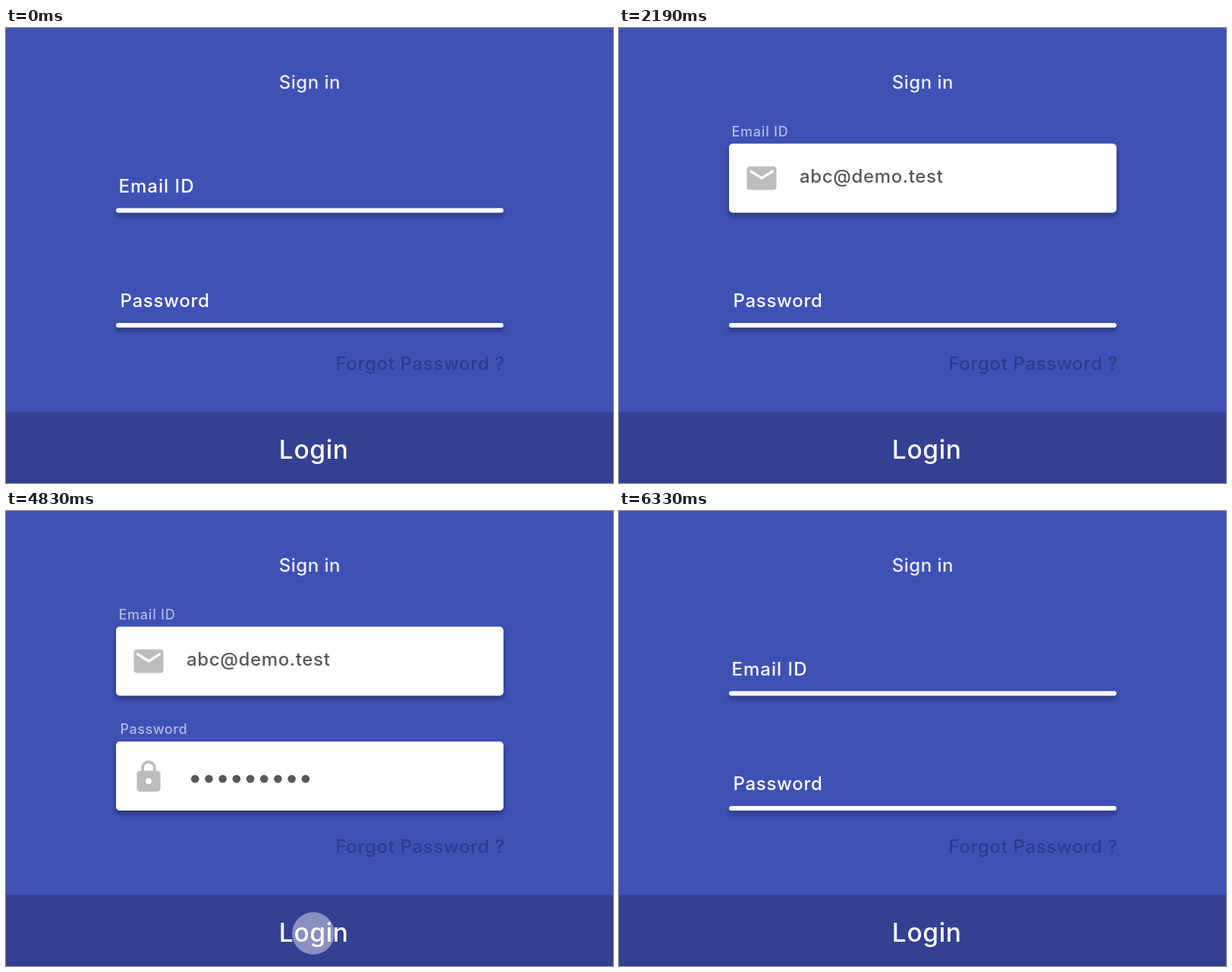
Write an HTML page that moves like this. It is 800x600 px and loops after 6450 ms.

```html
<!DOCTYPE html>
<html lang="en">
<head>
<meta charset="utf-8">
<title>Sign in</title>
<style>
  html, body { margin: 0; width: 100%; height: 100%; overflow: hidden; background: #3f51b5; }
  svg { display: block; width: 100vw; height: 100vh; }
  text { font: 500 24px Inter, "Open Sans", sans-serif; fill: #fff; white-space: pre; }
</style>
</head>
<body>
<svg id="stage" viewBox="0 0 800 600">
  <defs>
    <filter id="shadow" filterUnits="userSpaceOnUse" x="130" y="130" width="540" height="290">
      <feDropShadow dx="0" dy="4" stdDeviation="3" flood-color="#080c30" flood-opacity=".5"/>
    </filter>
  </defs>
  <rect width="800" height="600" fill="#3f51b5"/>
  <text x="359.8" y="80" letter-spacing=".5" opacity=".9">Sign in</text>
  <text x="434.4" y="451" letter-spacing=".66" style="fill:#2e3b88">Forgot Password ?</text>
  <rect y="506" width="800" height="94" fill="#344092"/>
  <g id="fields"></g>
  <g id="cover">
    <rect id="panel" width="800" fill="#344092"/>
    <polyline id="check" points="368.8,303.5 387.6,322.4 431.3,278.9" pathLength="100"
      fill="none" stroke="#fff" stroke-width="7.7"/>
  </g>
  <text id="login" x="359.8" y="567.5" letter-spacing=".65" style="font-size:33.5px">Login</text>
  <circle id="tap" fill="#fff"/>
</svg>
<script>
const LOOP = 6450;
const RESET = 5920;
const MAIL = "abc@demo.test";
const MAIL_ICON = "M20 4H4c-1.1 0-2 .9-2 2v12c0 1.1.9 2 2 2h16c1.1 0 2-.9 2-2V6c0-1.1-.9-2-2-2zm0 4l-8 5-8-5V6l8 5 8-5v2z";
const LOCK_ICON = "M18 8h-1V6c0-2.8-2.2-5-5-5S7 3.2 7 6v2H6c-1.1 0-2 .9-2 2v10c0 1.1.9 2 2 2h12c1.1 0 2-.9 2-2V10c0-1.1-.9-2-2-2zm-6 9a2 2 0 1 1 0-4 2 2 0 0 1 0 4zm3.1-9H8.9V6a3.1 3.1 0 0 1 6.2 0v2z";
const TAPS = [
  { at: 150, x: 201, y: 211 },
  { at: 2400, x: 207, y: 378 },
  { at: 4830, x: 405, y: 557 }
];

const $ = id => document.getElementById(id);
const ramp = (t, from, to) => Math.min(1, Math.max(0, (t - from) / (to - from)));
const sine = p => (1 - Math.cos(Math.PI * p)) / 2;
const easeOut = p => 1 - (1 - p) ** 2;

function set(el, attrs) {
  for (const key in attrs) el.setAttribute(key, attrs[key]);
  return el;
}

function add(parent, tag, attrs) {
  return parent.appendChild(set(document.createElementNS("http://www.w3.org/2000/svg", tag), attrs));
}

// One input: a line that grows into a box, with its label, icon and cursor
function makeField({ name, x, spacing, bottom, icon, iconTop, open, caret }) {
  const g = $("fields");
  const box = add(g, "rect", { x: 145, width: 510.6, fill: "#fff", filter: "url(#shadow)" });
  const label = add(g, "text", { "letter-spacing": spacing });
  label.textContent = name;
  const mark = add(g, "path", { d: icon, fill: "#bcbcbc" });
  const cursor = add(g, "rect", { x: 229, y: bottom - 61.5, width: 3, height: 34, fill: "#d2d2d2" });

  return t => {
    const grow = sine(ramp(t, open, open + 300));
    const height = 6.1 + 84.9 * grow;
    set(box, { y: bottom - height, height, rx: 3 + 2 * grow });

    // The label rises past its resting place, then settles back
    const rise = sine(ramp(t, open, open + 315));
    const back = sine(ramp(t, open + 320, open + 600));
    const y = bottom - 27 - 84 * rise + 10 * back;
    set(label, { transform: `translate(${x} ${y}) scale(${1 - 0.25 * rise})`, opacity: 1 - 0.4 * rise });

    const show = easeOut(ramp(t, open + 330, open + 600));
    const cy = iconTop + 12 * 1.95;
    set(mark, {
      transform: `translate(188 ${cy}) scale(${1.95 * show}) translate(-12 -12)`,
      opacity: show
    });
    set(cursor, { opacity: ramp(t, caret, caret + 150) - ramp(t, caret + 150, caret + 360) });
  };
}

const fields = [
  makeField({
    name: "Email ID", x: 148.4, spacing: 1.05, bottom: 243.5,
    icon: MAIL_ICON, iconTop: 174.6, open: 450, caret: 960
  }),
  makeField({
    name: "Password", x: 150.4, spacing: 0.72, bottom: 395,
    icon: LOCK_ICON, iconTop: 327, open: 2790, caret: 3360
  })
];

const mail = add($("fields"), "text", { x: 238, y: 204, "letter-spacing": 0.65, style: "fill:#58585a" });
const dots = Array.from({ length: 9 }, (_, i) =>
  add($("fields"), "circle", { cx: 249.2 + 18.2 * i, cy: 353.3, r: 5.3, fill: "#58585a" }));

const typed = (t, start, step) => Math.max(0, Math.floor((t - start) / step) + 1);

function draw(t) {
  const form = t < RESET ? t : 0;
  fields.forEach(update => update(form));
  mail.textContent = MAIL.slice(0, typed(form, 1360, 69));
  const count = typed(form, 3748, 90);
  dots.forEach((dot, i) => set(dot, { opacity: i < count ? 1 : 0 }));

  const fade = ramp(t, 6030, 6330);
  const top = 506 * (1 - sine(ramp(t, 5220, 5871)));
  set($("panel"), { y: top, height: 600 - top });
  set($("cover"), { opacity: t < 5220 ? 0 : 1 - fade });
  const drawn = 100 * sine(ramp(t, 5640, 5912));
  set($("check"), { "stroke-dasharray": `${drawn} 200`, opacity: drawn > 0 ? 1 : 0 });
  set($("login"), { opacity: 1 - ramp(t, 5220, 5430) + fade });

  const tap = TAPS.find(({ at }) => t >= at && t < at + 210);
  set($("tap"), { opacity: 0 });
  if (tap) {
    const p = (t - tap.at) / 210;
    set($("tap"), { cx: tap.x, cy: tap.y, r: 27.5 + 44.5 * easeOut(p), opacity: 0.42 * (1 - p) });
  }
}

const begin = performance.now();
function tick() {
  draw((performance.now() - begin) % LOOP);
  requestAnimationFrame(tick);
}
tick();
</script>
</body>
</html>
```
